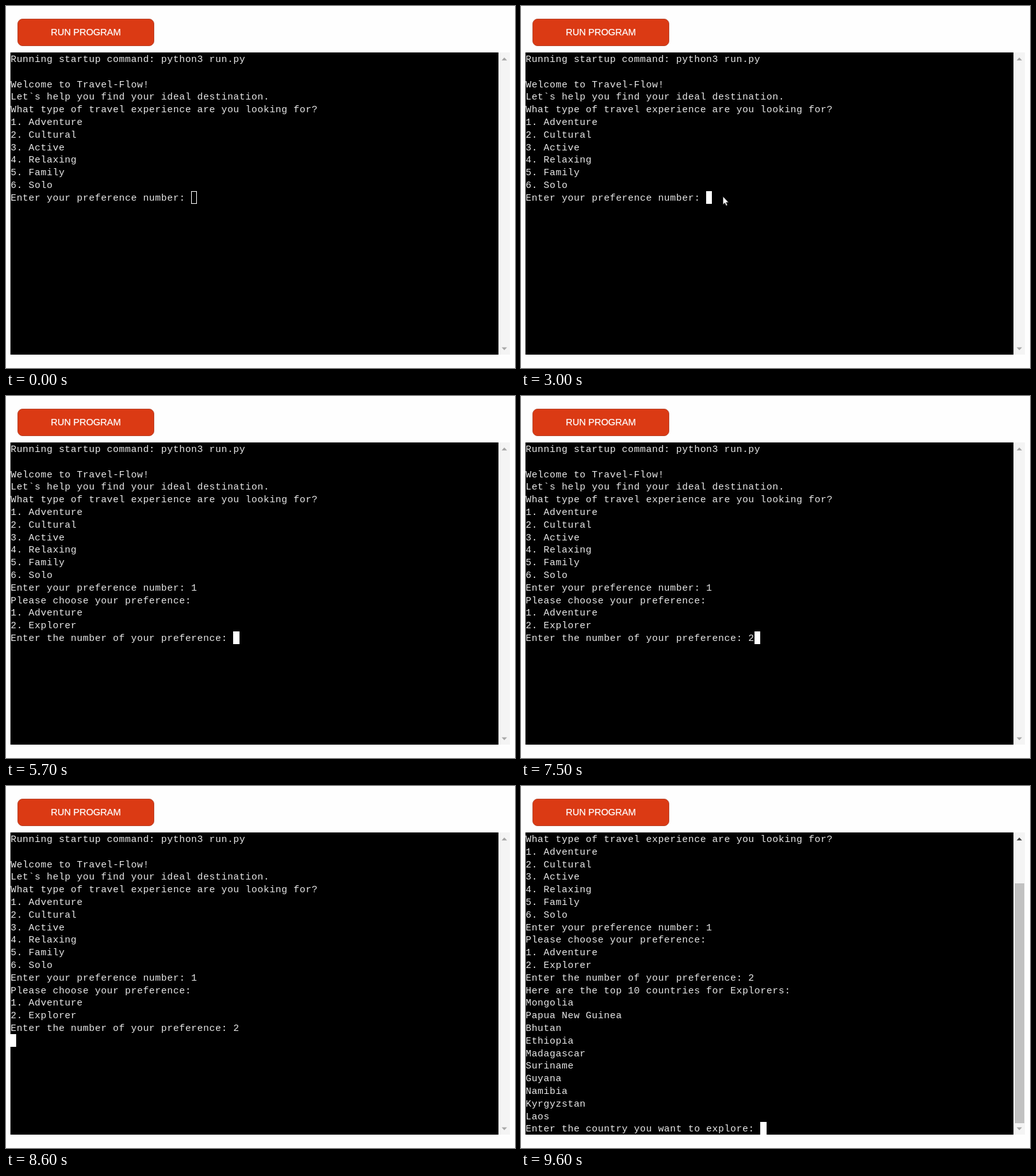
An HTML page for the animation above (10000 ms loop, 800 by 569 pixels).

```html
<!DOCTYPE html>
<html lang="en">
<head>
<meta charset="utf-8">
<title>Terminal session</title>
<style>
  html, body { margin: 0; width: 100%; height: 100%; overflow: hidden; background: #fefefe; }
  #stage { position: relative; width: 800px; height: 569px; overflow: hidden; }
  #stage > *, #term > * { position: absolute; box-sizing: border-box; }
  #run {
    left: 18px; top: 20px; width: 215px; height: 43px;
    border: 1px solid #b8452c; border-radius: 8px; background: #db3a14; color: #fff;
    font: 14.45px/40px "Liberation Sans", Arial, sans-serif; text-align: center;
    -webkit-text-stroke: .25px #fff;
  }
  #term { left: 7px; top: 73px; width: 767px; height: 475px; background: #000; overflow: hidden; }
  #text {
    left: .2px; top: 2px; margin: 0; color: #e8e8e8; letter-spacing: .463px;
    font: 15px/19.8px "Liberation Mono", "Courier New", monospace;
  }
  #caret { width: 9.46px; height: 19.8px; border: 1px solid #fff; }
  #caret.solid { background: #fff; }
  #bar { left: 774px; top: 73px; width: 18px; height: 475px; background: #f4f4f4; }
  #thumb { left: 776px; top: 153px; width: 15px; height: 377px; background: #c1c1c1; }
  #over { left: 0; top: 0; }
</style>
</head>
<body>
<div id="stage">
  <div id="run">RUN PROGRAM</div>
  <div id="term"><pre id="text"></pre><div id="caret"></div></div>
  <div id="bar"></div>
  <div id="thumb"></div>
  <svg id="over" width="800" height="569">
    <path id="up" d="M779 85.5L783.2 81L787.5 85.5Z"/>
    <path d="M779 536.5L783.2 541L787.5 536.5Z" fill="#a8a8a8"/>
    <path id="mouse" d="M317.5 299.5V312L320.4 309.4L322.5 314L324.4 313.1L322.4 308.7H326.2Z"
          fill="#fff" stroke="#222" stroke-width=".6"/>
  </svg>
</div>
<script>
const LOOP = 10000, COL = 9.463, ROW = 19.8, ROWS = 24;
const $ = id => document.getElementById(id);

const intro = `Running startup command: python3 run.py

Welcome to Travel-Flow!
Let\`s help you find your ideal destination.
What type of travel experience are you looking for?
1. Adventure
2. Cultural
3. Active
4. Relaxing
5. Family
6. Solo
Enter your preference number: `;
const choice = `1
Please choose your preference:
1. Adventure
2. Explorer
Enter the number of your preference: `;
const countries = `Here are the top 10 countries for Explorers:
Mongolia
Papua New Guinea
Bhutan
Ethiopia
Madagascar
Suriname
Guyana
Namibia
Kyrgyzstan
Laos
Enter the country you want to explore: `;

// Each step: start time, then the values it changes
const steps = [
  [0, { text: intro, focus: false, mouse: false }],
  [2800, { mouse: true }],
  [2900, { focus: true }],
  [4200, { text: intro + "1" }],
  [5000, { mouse: false }],
  [5600, { text: intro + choice }],
  [7500, { text: intro + choice + "2" }],
  [8300, { text: intro + choice + "2\n" }],
  [9300, { text: intro + choice + "2\n" + countries }],
];

function show({ text, focus, mouse }) {
  const lines = text.split("\n");
  const scrolled = lines.length > ROWS;
  const view = lines.slice(-ROWS);
  $("text").textContent = view.join("\n");
  $("caret").style.left = view.at(-1).length * COL + "px";
  $("caret").style.top = (view.length - 1) * ROW + "px";
  $("caret").className = focus ? "solid" : "";
  $("mouse").style.display = mouse ? "" : "none";
  $("thumb").style.display = scrolled ? "" : "none";
  $("up").setAttribute("fill", scrolled ? "#404040" : "#a3a3a3");
}

let shown = 0;
const start = performance.now();
function tick() {
  const t = (performance.now() - start) % LOOP;
  const due = steps.filter(([at]) => at <= t);
  if (due.length !== shown) {
    shown = due.length;
    show(Object.assign({}, ...due.map(([, change]) => change)));
  }
  requestAnimationFrame(tick);
}
tick();
</script>
</body>
</html>
```
